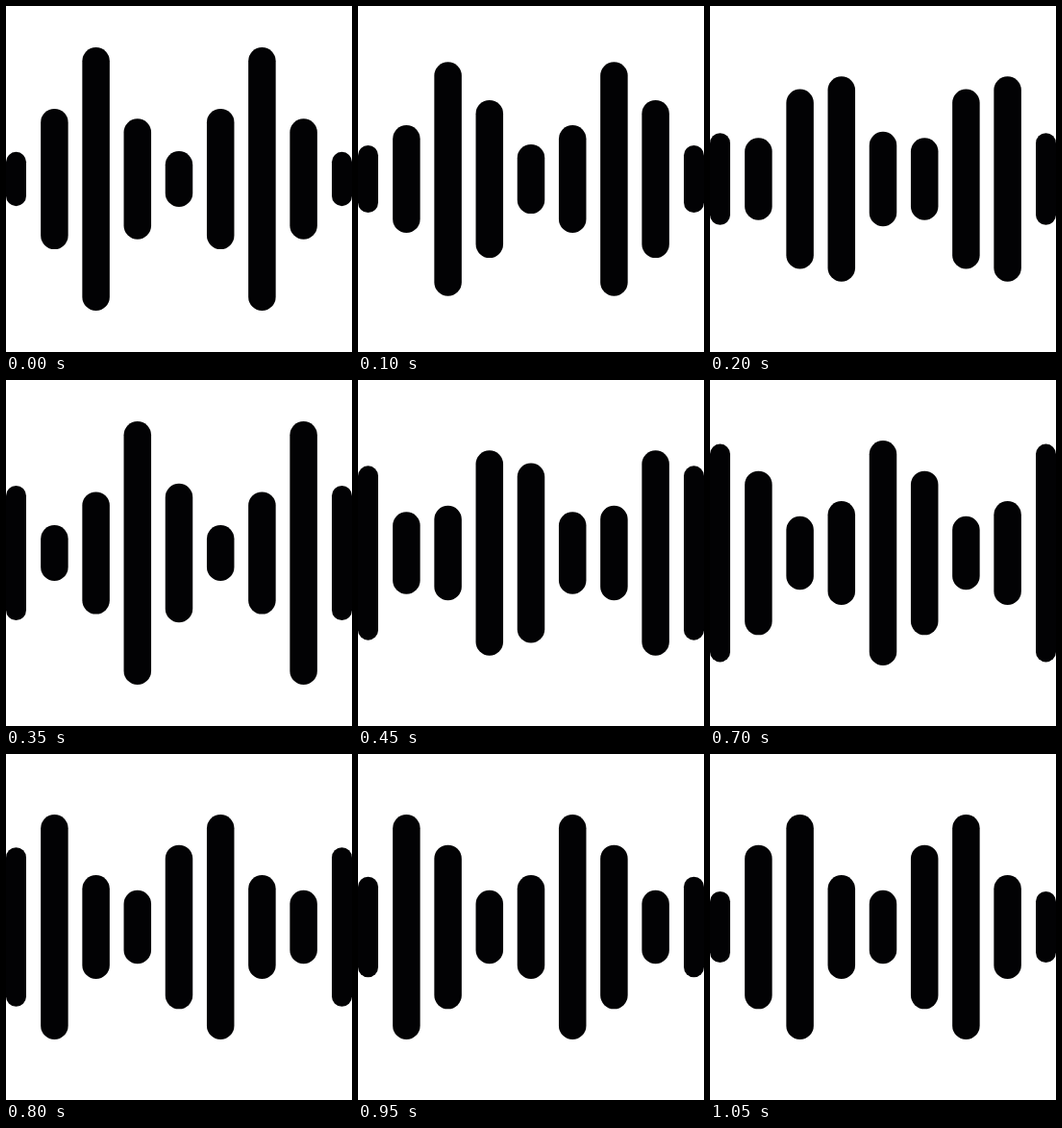
Write an HTML page that moves like this. It is 360 by 360 pixels and loops after 1.1 s.

```html
<!DOCTYPE html>
<html lang="en">
<head>
<meta charset="utf-8">
<title>Sound wave</title>
<style>
  html, body { margin: 0; width: 100%; height: 100%; overflow: hidden; background: #fff; }
  svg { display: block; width: 100%; height: 100%; }
</style>
</head>
<body>
<svg id="stage" viewBox="0 0 360 360" fill="#020204"></svg>
<script>
const SIZE = 360, MIDDLE = SIZE / 2;
const STEP = 50, RISE = 600, FALL = 500, LOOP = RISE + FALL, DELAY = 25;
const BAR_COUNT = 9, CENTRE = 4, PITCH = 43.2;
const BAR_WIDTH = 28.5, EDGE_WIDTH = 21, EDGE_SCALE = 0.97;
const CREST = 137, TROUGH = 29;

const isEdge = bar => bar === 0 || bar === BAR_COUNT - 1;

// Phase of the centre bar: 0 = trough, 0.5 = crest.
function wavePhase(time) {
  const t = (time - DELAY + LOOP) % LOOP;
  return t < RISE ? t / RISE / 2 : 0.5 + (t - RISE) / FALL / 2;
}

// Drops quickly near the crest and settles slowly towards the trough.
function decay(distance) {
  const x = Math.min(1, Math.max(0, (distance - 0.05) / 0.9));
  return x * (1 + 0.8 * (1 - x) ** 1.5);
}

// Each bar trails its left neighbour by a quarter of the wave.
function halfHeight(bar, time) {
  const phase = (wavePhase(time) - (bar - CENTRE) / 4 + 2) % 1;
  const distance = Math.abs(2 * phase - 1);
  const half = CREST - (CREST - TROUGH) * decay(distance);
  return isEdge(bar) ? half * EDGE_SCALE : half;
}

function barLeft(bar, width) {
  const left = MIDDLE + (bar - CENTRE) * PITCH - width / 2;
  return isEdge(bar) ? Math.min(SIZE - width, Math.max(0, left)) : left;
}

const stage = document.getElementById("stage");
const bars = Array.from({ length: BAR_COUNT }, (_, bar) => {
  const rect = document.createElementNS("http://www.w3.org/2000/svg", "rect");
  const width = isEdge(bar) ? EDGE_WIDTH : BAR_WIDTH;
  // The outer bars sit flush with the stage sides.
  const x = bar === 0 ? 0 : bar === BAR_COUNT - 1 ? SIZE - width : barLeft(bar, width);
  rect.setAttribute("x", x);
  rect.setAttribute("width", width);
  rect.setAttribute("rx", width / 2);
  return stage.appendChild(rect);
});

function draw(now) {
  const time = Math.floor((now % LOOP) / STEP) * STEP;
  bars.forEach((rect, bar) => {
    const half = halfHeight(bar, time);
    rect.setAttribute("y", MIDDLE - half);
    rect.setAttribute("height", 2 * half);
  });
}

const start = performance.now();
function tick() {
  draw(performance.now() - start);
  requestAnimationFrame(tick);
}
tick();
</script>
</body>
</html>
```
